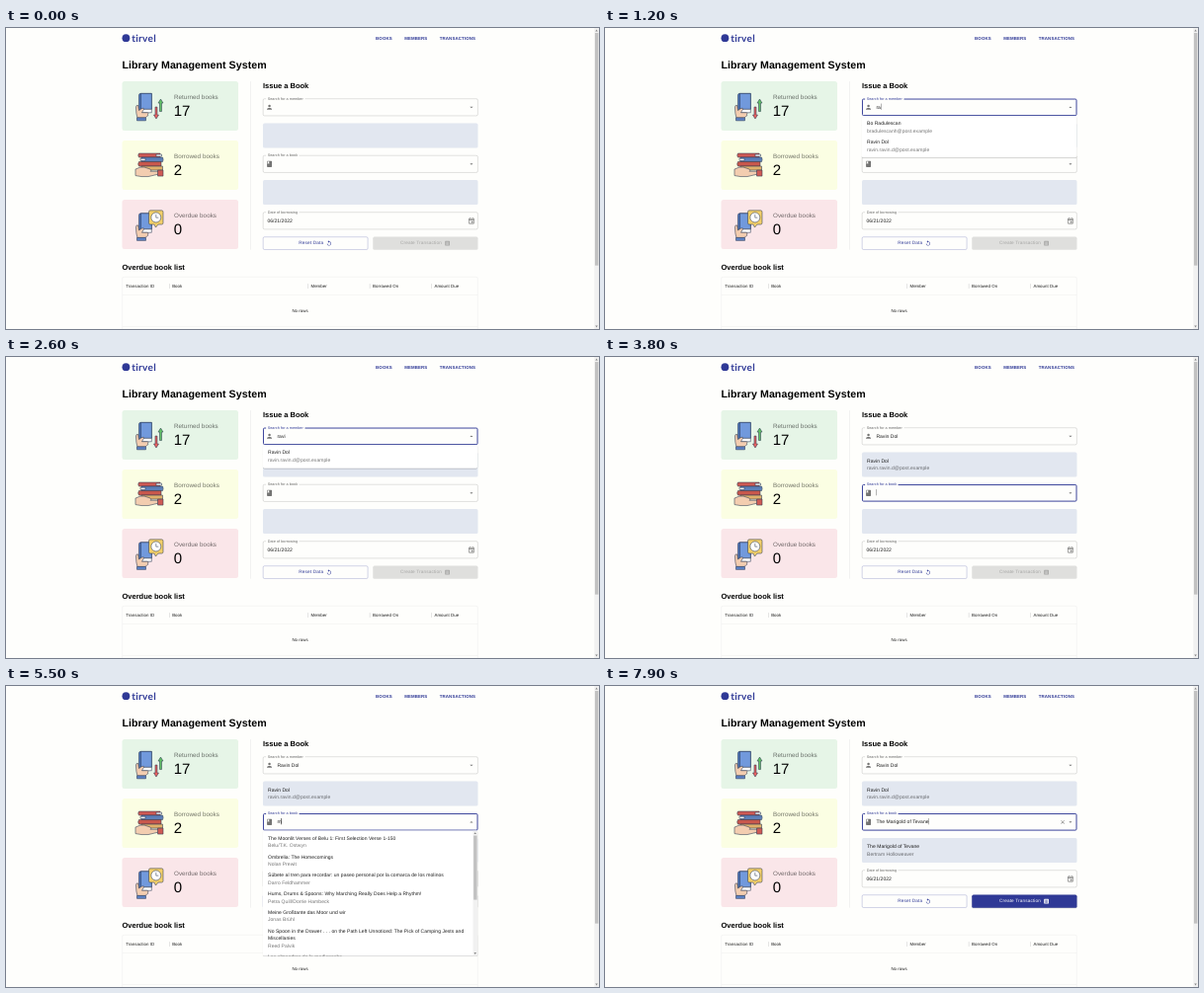
An HTML page that plays this animation: 600x305 px, repeating every 8 s.

```html
<!DOCTYPE html>
<html lang="en">
<head>
<meta charset="utf-8">
<title>Library Management System</title>
<style>
  html, body { margin: 0; width: 100%; height: 100%; overflow: hidden; background: #fefefc; }
  #page {
    position: absolute; left: 0; top: 0; width: 1920px; height: 976px; overflow: hidden;
    transform: scale(.3125); transform-origin: 0 0;
    font: 16px/24px "Liberation Sans", Arial, sans-serif; letter-spacing: .15px; color: #1c1c1c;
    text-rendering: geometricPrecision;
    --blue: #2f3996;
  }
  #page * { box-sizing: border-box; }
  .a, .t, .field, .info, .btn, .stat, .popup { position: absolute; }
  .t { line-height: 0; white-space: nowrap; }
  svg { display: block; fill: currentColor; }
  .nav { top: 34px; font-size: 14px; font-weight: bold; letter-spacing: .4px; color: var(--blue); }
  .h { font-size: 24px; font-weight: bold; letter-spacing: 0; color: #000; }

  .stat { left: 376px; width: 376px; height: 160px; border-radius: 8px; }
  .stat svg { position: absolute; left: 40px; top: 32px; width: 102.4px; height: 102.4px; stroke: #2b3752; stroke-width: .55; stroke-linejoin: round; }
  .stat .name { left: 168px; top: 52px; font-size: 20px; color: #0000008c; }
  .stat .num { left: 167px; top: 96px; font-size: 48px; letter-spacing: 0; color: #000; }

  .field { left: 832px; width: 696px; height: 56px; border: 1px solid #00000060; border-radius: 5px; }
  .field.hover { border-color: #000000de; }
  .field.focus { border: 3px solid var(--blue); }
  .field > * { position: absolute; }
  .field label { left: 9px; top: -7px; padding: 0 5px; font-size: 12px; line-height: 13px; background: #fefefc; color: #0009; white-space: nowrap; }
  .field.focus label { color: var(--blue); }
  .field.focus > * { margin: -2px; }
  .field svg { top: 15px; color: #0000008a; width: 24px; height: 24px; }
  .lead { left: 8px; }
  .value { left: 45px; top: 15px; white-space: pre; }
  .value i { display: inline-block; width: 1.2px; height: 20px; margin-right: -1.2px; vertical-align: -4px; background: #111; visibility: hidden; }
  .value.blink i { visibility: visible; }
  .arrow { left: 662px; }
  .open .arrow { transform: rotate(180deg); }
  .field .clear { left: 639px; top: 17px; width: 20px; height: 20px; visibility: hidden; }
  .chosen.focus .clear { visibility: visible; }

  .info { left: 832px; width: 696px; height: 80px; padding: 16px; border-radius: 5px; background: #e2e7f0; }
  small { display: block; font-size: 16px; color: #0000008c; }

  .btn { top: 677px; width: 340px; height: 42px; border-radius: 5px; display: flex; align-items: center; justify-content: center; gap: 8px; font-size: 15px; letter-spacing: .43px; }
  .btn svg { width: 20px; height: 20px; }
  #reset { left: 832px; color: var(--blue); border: 1px solid #2f3996b0; }
  #create { left: 1188px; background: #0000001f; color: #00000042; }
  #create.on { background: var(--blue); color: #fff; box-shadow: 0 3px 1px -2px #0003, 0 2px 2px #0002, 0 1px 5px #0002; }

  .popup { left: 832px; width: 695px; max-height: 406px; padding: 8px 0; overflow: hidden; border-radius: 5px; background: #fff;
    box-shadow: 0 2px 1px -1px #0003, 0 1px 1px #0002, 0 1px 3px #0002; }
  .popup div { padding: 6px 16px; }
  .popup.scroll { padding-right: 15px; }
  .bar { position: absolute; right: 0; top: 0; width: 15px; height: 100%; background: #f1f1f1; }
  .bar::before, .bar::after { content: ""; position: absolute; left: 3px; border: 4.5px solid transparent; }
  .bar::before { top: 1px; border-bottom: 6px solid #888; }
  .bar::after { bottom: 1px; border-top: 6px solid #888; }
  .bar b { position: absolute; left: 2px; right: 2px; top: 16px; background: #c1c1c1; }

  .table { left: 376px; top: 807px; width: 1152px; height: 220px; border: 1px solid #e0e0e0; border-radius: 5px; font-size: 14px; }
  .table .t { top: 29px; }
  .table .t::before { content: ""; position: absolute; left: -10px; top: -8px; width: 2px; height: 16px; background: #d6d6d6; }
  .table .t:first-child::before, .table .none::before { display: none; }
  .rule { left: 0; width: 100%; height: 1px; background: #e0e0e0; }
</style>
</head>
<body>
<div id="page">
  <div class="a" style="left:376px;top:20px;width:25px;height:25px;border-radius:50%;background:var(--blue)"></div>
  <div class="t" style="left:407px;top:33px;font:bold 32px/0 Lato,sans-serif;letter-spacing:1px;color:var(--blue)">tirvel</div>
  <div class="t nav" style="left:1197px">BOOKS</div>
  <div class="t nav" style="left:1290px">MEMBERS</div>
  <div class="t nav" style="left:1404px">TRANSACTIONS</div>

  <div class="t h" style="left:376px;top:119px;font-size:34px;letter-spacing:.2px">Library Management System</div>
  <div class="t h" style="left:832px;top:189px">Issue a Book</div>
  <div class="t h" style="left:376px;top:776px">Overdue book list</div>
  <div class="a" style="left:791px;top:173px;width:1px;height:546px;background:#d8d8d8"></div>

  <svg width="0" height="0" style="position:absolute">
    <defs>
      <g id="held">
        <path fill="#4a74bd" d="M4.500 4Q4.500 2.300 6.200 2.300H17.300V18.300H6.200Q4.500 18.300 4.500 20Z"/>
        <path fill="#7199dc" d="M6.500 2.300H17.300V18.300H6.500Z"/>
        <path fill="#fff" d="M17.300 18.300H6.200Q4.500 18.300 4.500 20T6.200 21.700H17.300Z"/>
        <path fill="#f3cdb0" d="M1.500 16Q1.800 13.500 3.800 14.500L4.500 19.500 7.500 17.500Q9.800 16.500 9.500 18.300L7.500 21.700H13Q15 22.200 13.500 23.500 14.500 25 12.500 25.500L11 27H3Q1.500 23 1.500 16Z"/>
        <path fill="#5d83c6" d="M2.500 26.800H11.500V29.800H2.500Z"/>
      </g>
    </defs>
  </svg>

  <div class="stat" style="top:173px;background:#e6f5e7">
    <svg viewBox="0 0 32 32">
      <use href="#held"/>
      <path fill="#62c466" d="M26.500 8 29 12H27.500V20.500H25.500V12H24Z"/>
      <path fill="#e8605f" d="M22 28 19.500 24H21V16H23V24H24.500Z"/>
    </svg>
    <div class="t name">Returned books</div><div class="t num">17</div>
  </div>
  <div class="stat" style="top:365px;background:#fbfee3">
    <svg viewBox="0 0 32 32">
      <path fill="#cf5a54" d="M4.500 3H26V7H4.500Q3 5 4.500 3Z"/>
      <path fill="#fff" d="M22 4H27.500V6H22Z"/>
      <path fill="#5c7fb8" d="M7 7H28.500Q29.700 9.200 28.500 11.500H7Z"/>
      <path fill="#fff" d="M6 8.200H11V10.300H6Z"/>
      <path fill="#c9584c" d="M4.500 11.500H27V16H4.500Q3 13.700 4.500 11.500Z"/>
      <path fill="#e0b06a" d="M7 16H28.500V20H7Z"/>
      <path fill="#f3cdb0" d="M1 19 6 17H10L16 19Q18 20.200 16 21.200H26Q28.500 22.200 26.500 23.500L14 26.500H7L1 25.500Z"/>
      <path fill="#cf5a54" d="M23.500 20H29V26H23.500Z"/>
    </svg>
    <div class="t name">Borrowed books</div><div class="t num">2</div>
  </div>
  <div class="stat" style="top:557px;background:#fae6e9">
    <svg viewBox="0 0 32 32">
      <use href="#held" y="1.500"/>
      <path fill="#f2cf69" d="M16 .8H27.500Q29 .8 29 2.300V13.500Q29 15 27.500 15H24L21.500 18 20 15H16Q14.500 15 14.500 13.500V2.300Q14.500 .8 16 .8Z"/>
      <circle cx="21.800" cy="7.900" r="5" fill="#fff"/>
      <path fill="none" d="M21.800 4.800V8.100H24.300"/>
    </svg>
    <div class="t name">Overdue books</div><div class="t num">0</div>
  </div>

  <div class="info" id="memberInfo" style="top:309px"></div>
  <div class="info" id="bookInfo" style="top:493px"></div>
  <div class="field" id="member" style="top:229px"></div>
  <div class="field" id="book" style="top:413px"></div>
  <div class="field" style="top:597px">
    <label>Date of borrowing</label>
    <span class="value" style="left:13px">06/21/2022</span>
    <svg style="left:662px" viewBox="0 0 24 24"><path d="M19 4h-1V2h-2v2H8V2H6v2H5c-1.100 0-2 .9-2 2v14c0 1.100.9 2 2 2h14c1.100 0 2-.9 2-2V6c0-1.100-.9-2-2-2zm0 16H5V10h14zm0-12H5V6h14zm-7 5h5v5h-5z"/></svg>
  </div>
  <div class="btn" id="reset">Reset Data
    <svg viewBox="0 0 24 24"><path d="M12 5V1L7 6l5 5V7a6 6 0 1 1-6 6H4a8 8 0 1 0 8-8z"/></svg>
  </div>
  <div class="btn" id="create">Create Transaction
    <svg viewBox="0 0 24 24"><path fill-rule="evenodd" d="M19 3H5a2 2 0 0 0-2 2v14a2 2 0 0 0 2 2h14a2 2 0 0 0 2-2V5a2 2 0 0 0-2-2zM7 7h10v2H7zm0 4h10v2H7zm0 4h10v2H7z"/></svg>
  </div>

  <div class="a table">
    <div class="t" style="left:11px">Transaction ID</div>
    <div class="t" style="left:161px">Book</div>
    <div class="t" style="left:610px">Member</div>
    <div class="t" style="left:810px">Borrowed On</div>
    <div class="t" style="left:1010px">Amount Due</div>
    <div class="a rule" style="top:56px"></div>
    <div class="t none" style="left:549px;top:109px">No rows</div>
    <div class="a rule" style="top:160px"></div>
  </div>

  <div class="popup" id="memberList" style="top:285px"></div>
  <div class="popup" id="bookList" style="top:469px"></div>
  <div class="bar"><b style="height:754px"></b></div>
</div>

<script>
const $ = id => document.getElementById(id);

const fields = {
  member: {
    thumb: 30,
    icon: 'M12 12a4 4 0 1 0 0-8 4 4 0 0 0 0 8zm0 2c-2.670 0-8 1.340-8 4v2h16v-2c0-2.660-5.330-4-8-4z',
    options: [
      ['Lew Harkavey', 'lharkaveyc@post.example'],
      ['Rosetta Plumb', 'rplumb4@ko.example'],
      ['Clementa Farrowdale', 'cfarrowdalee@kit.example'],
      ['Tobin Hessel', 'thesself@harbour.example'],
      ['Lena Portobelli', 'lportobellig@ray.example'],
      ['Bo Radulescan', 'bradulescanh@post.example'],
      ['Selina Dorvat', 'sdorvat2@kit.example'],
      ['Ravin Dol', 'ravin.ravin.d@post.example']
    ]
  },
  book: {
    thumb: 208,
    icon: 'M18 2H6c-1.100 0-2 .9-2 2v16c0 1.100.9 2 2 2h12c1.100 0 2-.9 2-2V4c0-1.100-.9-2-2-2zM6 4h5v8l-2.500-1.500L6 12z',
    options: [
      ['The Moonlit Verses of Belu 1: First Selection Verse 1-150', 'Belu/T.K. Ostwyn'],
      ['Ombrelia: The Homecomings', 'Nolan Prewit'],
      ['Súbete al tren para recordar: un paseo personal por la comarca de los molinos', 'Darro Feldhammer'],
      ['Hums, Drums & Spoons: Why Marching Really Does Help a Rhythm!', 'Petra Quill/Dorrie Hambeck'],
      ['Meine Großtante das Moor und wir', 'Jonas Brühl'],
      ['No Spoon in the Drawer . . . on the Path Left Unnoticed: The Pick of Camping Jests and Miscellanies', 'Reed Palvik'],
      ['Los almendros de la medianoche', 'Ines Carvalda'],
      ['The Marigold of Tevane', 'Bertram Holloweaver'],
      ['Marble Weather', 'Odile Fenwarth'],
      ['Summary of a Marsh', 'Tessa Lindqvar'],
      ['The Long Market Day', 'Hugo Pellam']
    ]
  }
};

// [start in ms, changed properties]
const steps = [
  [0, { hover: '', focus: '', open: '', caret: false, member: '', book: '', chosen: '' }],
  [100, { hover: 'member' }],
  [400, { focus: 'member', open: 'member', caret: true }],
  [800, { caret: false }],
  [1100, { caret: true, member: 'r' }],
  [1200, { member: 'ra' }],
  [1300, { member: 'rav' }],
  [1700, { member: 'ravi' }],
  [2200, { caret: false }],
  [2800, { caret: true }],
  [3200, { open: '', member: 'Ravin Dol', chosen: 'member' }],
  [3400, { hover: 'book' }],
  [3800, { focus: 'book' }],
  [4300, { caret: false }],
  [5000, { caret: true }],
  [5500, { book: 'm', open: 'book' }],
  [5600, { book: 'ma' }],
  [5800, { book: 'mar' }],
  [6300, { book: 'marig' }],
  [7000, { caret: false }],
  [7600, { caret: true }],
  [7800, { open: '', book: 'The Marigold of Tevane', chosen: 'member book' }]
];

const icon = (cls, d) => `<svg class="${cls}" viewBox="0 0 24 24"><path d="${d}"/></svg>`;
const lines = ([name, note]) => `${name.replace('&', '&amp;')}<small>${note}</small>`;

for (const [id, f] of Object.entries(fields)) {
  $(id).innerHTML = `<label>Search for a ${id}</label>` + icon('lead', f.icon) +
    '<span class="value"><span></span><i></i></span>' +
    icon('clear', 'M19 6.400 17.600 5 12 10.600 6.400 5 5 6.400 10.600 12 5 17.600 6.400 19 12 13.400 17.600 19 19 17.600 13.400 12z') +
    icon('arrow', 'M7 10l5 5 5-5z');
}

function drawField(id, s) {
  const { options, thumb } = fields[id];
  const el = $(id), list = $(id + 'List'), value = el.querySelector('.value');
  const focus = s.focus === id, open = s.open === id, chosen = s.chosen.includes(id);
  el.classList.toggle('hover', s.hover === id);
  el.classList.toggle('focus', focus);
  el.classList.toggle('open', open);
  el.classList.toggle('chosen', chosen);
  value.classList.toggle('blink', focus && s.caret);
  value.firstChild.textContent = s[id];
  $(id + 'Info').innerHTML = chosen ? lines(options.find(o => o[0] === s[id])) : '';
  list.style.display = open ? 'block' : 'none';
  if (!open) return;
  const hits = options.filter(o => o[0].toLowerCase().includes(s[id]));
  const scroll = hits.length > 6;
  list.classList.toggle('scroll', scroll);
  list.innerHTML = hits.map(o => `<div>${lines(o)}</div>`).join('') +
    (scroll ? `<span class="bar"><b style="height:${thumb}px"></b></span>` : '');
}

const start = performance.now();
let shown = 0;

function frame() {
  const t = (performance.now() - start) % 8000;
  const past = steps.filter(step => step[0] <= t);
  if (past.length !== shown) {
    shown = past.length;
    const s = Object.assign({}, ...past.map(step => step[1]));
    drawField('member', s);
    drawField('book', s);
    $('create').classList.toggle('on', s.chosen.includes('book'));
  }
  requestAnimationFrame(frame);
}
frame();
</script>
</body>
</html>
```
